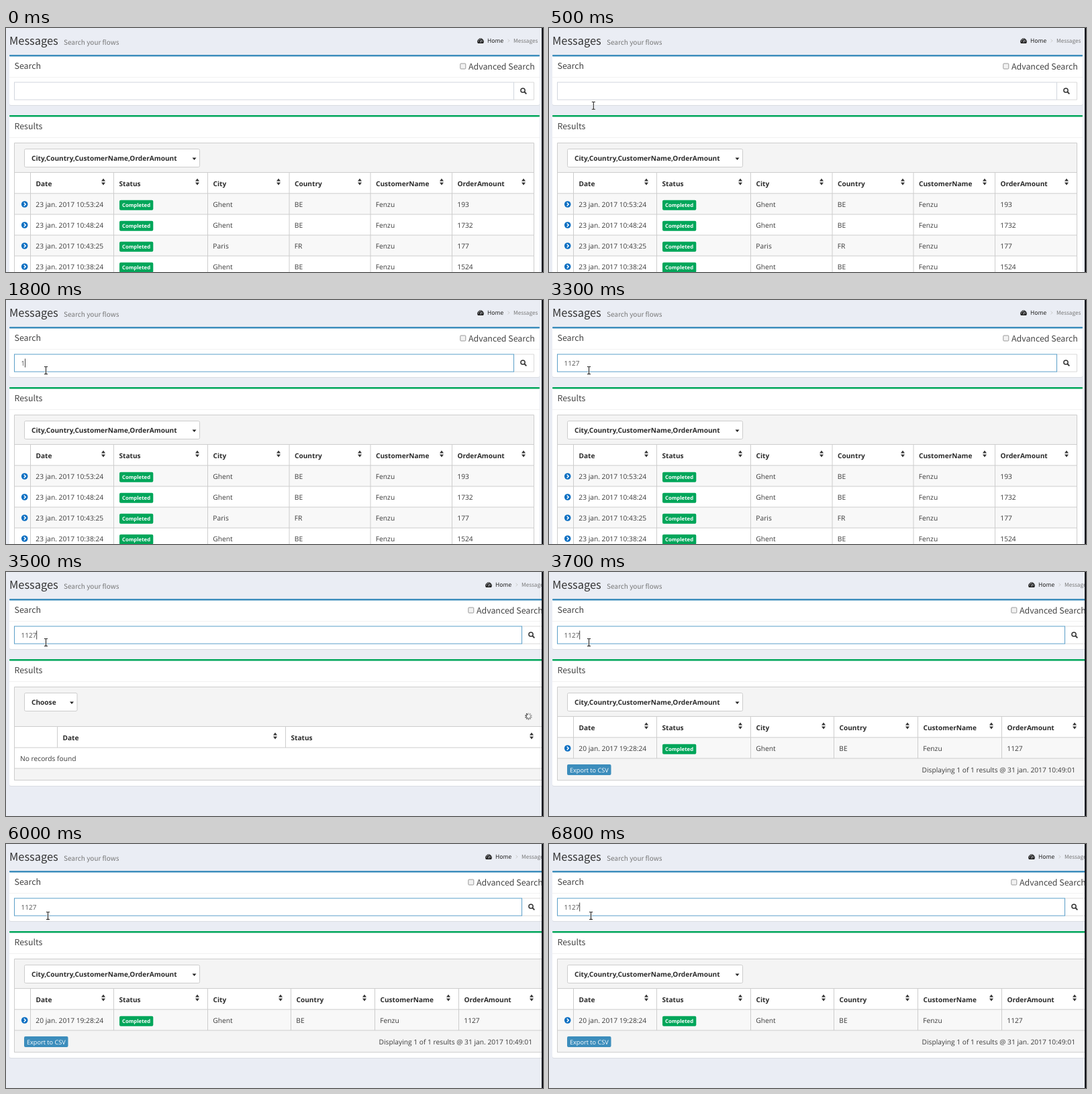
Write an HTML page that moves like this. It is 800 px wide and 364 px high and loops after 7100 ms.

```html
<!DOCTYPE html>
<html lang="en">
<head>
<meta charset="utf-8">
<title>Message search</title>
<style>
  html, body { margin: 0; width: 100%; height: 100%; overflow: hidden; background: #eaedf4; }
  svg { display: block; width: 100vw; height: 100vh; }
  text { font: 10.24px "Open Sans", "Noto Sans", sans-serif; fill: #3a3a3a; white-space: pre; text-rendering: geometricPrecision; }
  .bold { font-size: 10.12px; font-weight: 700; fill: #2b2b2b; }
  .head { font: 16.4px "Noto Sans CJK JP", "Noto Sans CJK SC", "Noto Sans", sans-serif; fill: #333; }
  .title { font-size: 12.4px; fill: #444; }
  .sub { font-size: 10px; font-weight: 300; fill: #777; }
  .option { font-size: 12.4px; font-weight: 300; fill: #444; }
  .crumb { font-size: 8.2px; fill: #777; }
  .home { font-size: 8.6px; fill: #222; }
  .badge { font-size: 7.75px; font-weight: 700; fill: #fff; }
  .export { font-size: 9.15px; fill: #fff; }
  .typed { font-size: 10px; fill: #555; }
</style>
</head>
<body>
<svg id="stage" viewBox="0 0 800 364" preserveAspectRatio="none"></svg>
<script>
const LOOP = 7100, FOCUS = 800, SEARCH = 3500, LOADED = 3600;
const KEYS = [[1800, '1'], [2000, '11'], [2300, '112'], [2500, '1127']];
const LINE = '#cdcdcd', GREEN = '#00a65a', BLUE = '#3c8dbc';
const stage = document.getElementById('stage');

function add(parent, tag, attrs, content) {
  const node = document.createElementNS('http://www.w3.org/2000/svg', tag);
  for (const key in attrs) node.setAttribute(key, attrs[key]);
  if (content !== undefined) node.textContent = content;
  return parent.appendChild(node);
}
const group = (parent = stage) => add(parent, 'g', {});
const rect = (g, x, y, width, height, fill, more) =>
  add(g, 'rect', { x, y, width, height, fill, ...more });
const path = (g, d, fill, more) => add(g, 'path', { d, fill, ...more });
const line = (g, d, stroke = LINE, width = 1) =>
  path(g, d, 'none', { stroke, 'stroke-width': width });
const text = (g, x, y, content, style = '', more) =>
  add(g, 'text', { x, y, class: style, ...more }, content);
const show = (node, visible) => node.setAttribute('display', visible ? 'inline' : 'none');

function panel(g, y, bottom, right, color) {
  rect(g, 5, y + 1, right - 5, bottom - y, '#d9dce2', { rx: 2.5 });
  rect(g, 5, y, right - 5, bottom - y, '#fff', { rx: 2.5 });
  rect(g, 5, y, right - 5, 2.4, color, { rx: 1 });
  line(g, `M5 ${y + 33.5}H${right}`, '#f2f2f2');
}

function sortIcon(g, x, y) {
  path(g, `M${x - 3} ${y - 1}l3 -4l3 4zM${x - 3} ${y + 1}l3 4l3 -4z`, '#333');
}

function picker(g, label, width) {
  rect(g, 27.5, 180.5, width, 27, '#fff', { rx: 2, stroke: '#ccc' });
  text(g, 38, 198.3, label, 'bold');
  path(g, `M${width + 16.5} 193.5h6l-3 3.4z`, '#222');
}

// Search panel and page header; dx is the extra width without a scrollbar.
function chrome(dx) {
  const g = group();
  text(g, 5, 25, 'Messages', 'head');
  text(g, 86, 25, 'Search your flows', 'head sub');
  const right = group(g);
  right.setAttribute('transform', `translate(${dx} 0)`);
  path(right, 'M703 23a4.8 4.8 0 1 1 8 0z', '#2b2b2b');
  line(right, 'M707 21.5l1.2 -3.6', '#eaedf4', 0.9);
  for (const [x, y] of [[704, 19.5], [705, 17.2], [707, 16.2], [710, 19.5]])
    add(right, 'circle', { cx: x, cy: y, r: 0.6, fill: '#eaedf4' });
  text(right, 717, 22, 'Home', 'head home');
  line(right, 'M747.5 16.8l2.6 2.2l-2.6 2.2', '#c4c4c4', 0.8);
  text(right, 756, 22, 'Messages', 'head crumb');

  panel(g, 40, 115, 795 + dx, BLUE);
  text(g, 12.5, 61, 'Search', 'head title');
  const input = rect(g, 12.5, 81, 744 + dx, 26, '#fff', { stroke: '#d2d6de' });
  const tools = group(g);
  tools.setAttribute('transform', `translate(${dx} 0)`);
  rect(tools, 676.8, 53, 8, 8, '#f2f2f2', { rx: 1, stroke: '#999' });
  text(tools, 689, 62, 'Advanced Search', 'head option');
  line(tools, 'M757 81H786.5V107H757', '#d9d9d9');
  add(tools, 'circle', { cx: 770, cy: 93, r: 3.1, fill: 'none', stroke: '#333', 'stroke-width': 1.5 });
  line(tools, 'M772.2 95.2L775.3 98.3', '#333', 1.9);
  return { g, input };
}

function tableHead(g, edges, labels, icons, top) {
  rect(g, 13, top, edges.at(-1) - 13, 32, '#fff');
  labels.forEach((label, i) => {
    text(g, edges[i + 1] + 8, top + 20.5, label, 'bold');
    sortIcon(g, icons[i], top + 14);
  });
}

function grid(g, edges, rules, top, bottom) {
  const right = edges.at(-1);
  for (const y of rules) line(g, `M12.5 ${y}H${right}`);
  for (const x of edges) line(g, `M${x} ${top}V${bottom}`);
}

function record(g, edges, y, cells, fill) {
  rect(g, 13, y, edges.at(-1) - 13, 31, fill);
  add(g, 'circle', { cx: 27.7, cy: y + 16, r: 4.8, fill: '#0b6fc2' });
  line(g, `M26.7 ${y + 13.5}l2.5 2.5l-2.5 2.5`, '#fff', 1.5);
  rect(g, 169, y + 9.7, 50.3, 15, GREEN, { rx: 2 });
  text(g, 173, y + 20, 'Completed', 'badge');
  cells.forEach((cell, i) => text(g, edges[i ? i + 2 : 1] + 7.8, y + 20, cell));
}

function resultsTable(dx, edges, icons, records) {
  const g = group(), single = records.length === 1;
  panel(g, 130, single ? 319 : 400, 795 + dx, GREEN);
  text(g, 12.5, 151, 'Results', 'head title');
  rect(g, 13, 172, edges.at(-1) - 13, single ? 139 : 220, '#f4f4f4');
  picker(g, 'City,Country,CustomerName,OrderAmount', 261);
  tableHead(g, edges, ['Date', 'Status', 'City', 'Country', 'CustomerName', 'OrderAmount'], icons, 215.5);
  const rules = [171.5, 215.5, 246.8];
  records.forEach((cells, i) => {
    record(g, edges, 247 + i * 31, cells, i % 2 ? '#fff' : '#f8f8f8');
    rules.push(278 + i * 31);
  });
  if (single) {
    rules.push(310.7);
    rect(g, 27, 287, 65.5, 16, BLUE, { rx: 2 });
    text(g, 31, 298.5, 'Export to CSV', 'export');
    text(g, 784, 298.5, 'Displaying 1 of 1 results @ 31 jan. 2017 10:49:01', '', { 'text-anchor': 'end' });
  }
  grid(g, edges, rules, 215.5, single ? 278 : 364);
  line(g, `M12.5 171.5V${single ? 311 : 364}M${edges.at(-1)} 171.5V364`);
  return g;
}

function emptyTable() {
  const g = group(), edges = [12.5, 76.5, 416.5, 799];
  panel(g, 130, 319, 807, GREEN);
  text(g, 12.5, 151, 'Results', 'head title');
  rect(g, 13, 172, 786, 139, '#f4f4f4');
  picker(g, 'Choose', 78.5);
  for (let i = 0; i < 10; i++)
    rect(g, 777.6, 210, 1.6, 2.8, '#333', {
      opacity: 0.3 + 0.07 * i, transform: `rotate(${i * 36} 778.4 215.3)`
    });
  tableHead(g, edges, ['Date', 'Status'], [401, 783], 230.5);
  rect(g, 13, 262, 786, 31, '#fff');
  text(g, 21, 282, 'No records found');
  grid(g, edges, [171.5, 230.5, 262, 293, 310.5], 230.5, 262);
  line(g, 'M12.5 171.5V311');
  return g;
}

const company = 'Fenzu';
const narrow = chrome(0), wide = chrome(12);
const listing = resultsTable(0, [12.5, 36.5, 160.5, 300.5, 422, 543, 664.5, 786.5],
  [145, 285, 406, 527, 649, 771], [
    ['23 jan. 2017 10:53:24', 'Ghent', 'BE', company, '193'],
    ['23 jan. 2017 10:48:24', 'Ghent', 'BE', company, '1732'],
    ['23 jan. 2017 10:43:25', 'Paris', 'FR', company, '177'],
    ['23 jan. 2017 10:38:24', 'Ghent', 'BE', company, '1524']
  ]);
const waiting = emptyTable();
const found = resultsTable(12, [12.5, 36.5, 160.5, 300.5, 424.5, 549.5, 674.5, 799],
  [145, 285, 409, 534, 659, 783],
  [['20 jan. 2017 19:28:24', 'Ghent', 'BE', company, '1127']]);

const typed = text(stage, 22.5, 97.7, '', 'typed');
const caret = rect(stage, 0, 87.5, 1, 13, '#444');
const pointer = group();
const beam = 'M-2.5 -5.5H-.8L0 -4.8L.8 -5.5H2.5M0 -4.8V4.8M-2.5 5.5H-.8L0 4.8L.8 5.5H2.5';
line(pointer, beam, '#fff', 2.4);
line(pointer, beam, '#222', 1.1);
rect(stage, 798, 0, 2, 364, '#15161c');

function pointerAt(t) {
  if (t < 600) {
    const p = Math.max(0, (t - 100) / 500), left = (1 - p) ** 2;
    return [59.5 + 170 * left, 105 + 270 * left];
  }
  const p = Math.min(1, Math.max(0, (t - 3900) / 200));
  return [59.5 + 3 * p, 105 + 2 * p];
}

function caretOn(t) {
  if (t < FOCUS) return false;
  if (t >= 7000) return true;
  const start = KEYS.reduce((last, [at]) => at <= t ? at : last, FOCUS);
  return (t - start) % 1000 < 500;
}

function draw(now) {
  const t = Math.floor(now % LOOP / 100) * 100;
  const word = KEYS.reduce((last, [at, value]) => at <= t ? value : last, '');
  show(narrow.g, t < SEARCH);
  show(wide.g, t >= SEARCH);
  show(listing, t < SEARCH);
  show(waiting, t >= SEARCH && t < LOADED);
  show(found, t >= LOADED);
  narrow.input.setAttribute('stroke', t >= FOCUS ? '#5b9fc9' : '#d2d6de');
  wide.input.setAttribute('stroke', '#5b9fc9');
  typed.textContent = word;
  caret.setAttribute('x', 22.3 + 5.72 * word.length);
  show(caret, caretOn(t));
  show(pointer, t >= 100);
  pointer.setAttribute('transform', `translate(${pointerAt(t)})`);
}

const began = performance.now();
function tick() {
  draw(performance.now() - began);
  requestAnimationFrame(tick);
}
tick();
</script>
</body>
</html>
```
